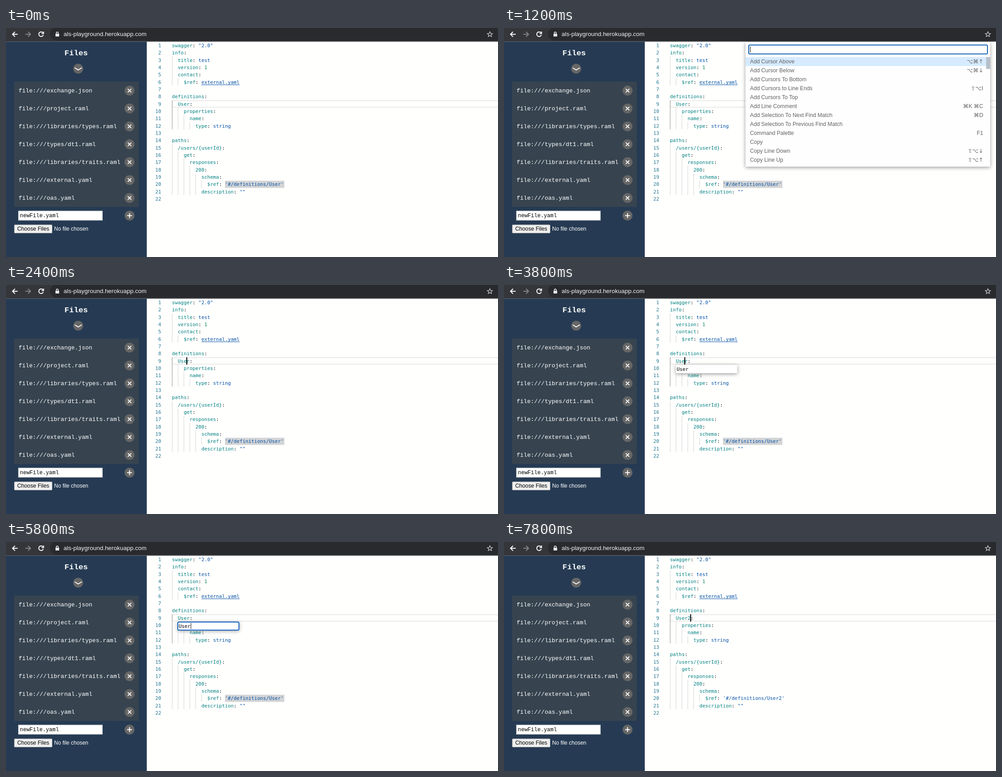
An HTML page that plays this animation: 1094x512 px, repeating every 8 s.

```html
<!DOCTYPE html>
<html lang="en">
<head>
<meta charset="utf-8">
<title>Rename playground</title>
<style>
  html, body { margin: 0; width: 100%; height: 100%; overflow: hidden; background: #fffffe; }
  svg { display: block; width: 1094px; height: 512px; }
  text { white-space: pre; }
  .code { font: 10.86px "DejaVu Sans Mono", monospace; }
  .courier { font: 13px "Liberation Mono", monospace; fill: #fff; }
  .ui { font: 12.2px "Liberation Sans", sans-serif; fill: #616161; }
  .sym { font-family: "DejaVu Sans", sans-serif; }
  .key { fill: #008080; }
  .str { fill: #0451a5; }
  .num { fill: #237893; text-anchor: end; }
  .line { fill: none; stroke: #fff; stroke-width: 2; }
  .shadow { filter: drop-shadow(0 2px 4px #0006); }
</style>
</head>
<body>
<svg viewBox="0 0 1094 512">
  <rect width="1094" height="512" fill="#fffffe"/>
  <rect width="1094" height="30.5" fill="#35363a"/>
  <rect x="98" y="-1" width="1020" height="29" rx="14" fill="#282a2d"/>
  <g class="line">
    <path d="M26 14H15M20 8.5L14.5 14L20 19.5"/>
    <path d="M43 14H54M49 8.5L54.5 14L49 19.5" style="stroke:#85868a"/>
    <path d="M82 10.5A5.2 5.2 0 1 0 83 15.5M83.5 8V12.5H79"/>
    <path d="M111.8 13V11.3A2.3 2.3 0 0 1 116.4 11.3V13" style="stroke-width:1.4"/>
    <path id="star" style="stroke:#c8cacd;stroke-width:1.3"/>
  </g>
  <rect x="110" y="12.7" width="8.2" height="6.3" rx="1" fill="#e8eaed"/>
  <text x="128" y="18" class="ui" style="font-size:13.45px;fill:#f1f3f4">als-playground.herokuapp.com</text>

  <rect y="30.5" width="313" height="482" fill="#263b53"/>
  <text x="156" y="61" class="courier" text-anchor="middle" style="font-size:17.3px;font-weight:bold">Files</text>
  <circle cx="160.5" cy="91" r="11" fill="#666"/>
  <path class="line" d="M153 89L159 93Q160.5 94.2 162 93L168.500 89"/>
  <rect x="18" y="120" width="277" height="280" fill="#374450"/>
  <g id="files"></g>
  <rect x="27.5" y="409" width="187" height="21" fill="#fff" stroke="#b5bac0"/>
  <text x="31" y="423" class="courier" style="font-size:12px;fill:#000">newFile.yaml</text>
  <rect x="18.5" y="440" width="84" height="18.5" rx="1.5" fill="#efefef" stroke="#a0a4a9"/>
  <text x="25" y="453.3" class="ui" style="fill:#000">Choose Files</text>
  <text x="107" y="453.3" class="ui" style="fill:#fff;font-size:12px">No file chosen</text>

  <path d="M1094 162.5H369.5V177H1094" fill="none" stroke="#e4e4e4" stroke-width="1.5"/>
  <rect id="mark" x="487" y="341.5" width="132" height="16" fill="#d3d4d6"/>
  <g id="code" class="code"></g>
  <path d="M434.5 127H519.5" stroke="#0451a5"/>
  <rect id="caret" y="161.5" width="2" height="16.5"/>

  <g id="rename">
    <rect class="shadow" x="382" y="178" width="136.5" height="19" fill="#fff"/>
    <rect id="focus" x="382" y="179" width="136" height="18" rx="2.5" fill="none" stroke="#0f63c6" stroke-width="2"/>
    <text x="384" y="191.8" class="code">User<tspan class="typed"></tspan></text>
    <rect id="renameCaret" y="181" width="1" height="13.5"/>
  </g>

  <g id="palette">
    <rect class="shadow" x="537" y="31" width="544" height="279" fill="#fefefe"/>
    <rect x="544" y="38" width="531" height="20" rx="2.5" fill="#fff" stroke="#1264b5" stroke-width="2"/>
    <rect id="queryCaret" x="547" y="41" width="1" height="14"/>
    <rect x="537" y="65" width="544" height="20" fill="#d6ebff"/>
    <rect x="1072" y="65" width="9" height="26.5" fill="#b7c0c9"/>
    <g id="commands" class="ui"></g>
  </g>
</svg>
<script>
const $ = id => document.getElementById(id);
const CHAR = 6.54, LEFT = 369, PITCH = 16.333;
const TYPED = '<tspan class="typed"></tspan>';

const button = (y, turn) =>
  `<g transform="translate(274.7 ${y}) rotate(${turn})"><circle r="11" fill="#666"/>
   <path class="line" d="M-5.5 0H5.5M0 -5.5V5.5"/></g>`;

const files = ['exchange.json', 'project.raml', 'libraries/types.raml', 'types/dt1.raml',
  'libraries/traits.raml', 'external.yaml', 'oas.yaml'];
$('files').innerHTML = files.map((name, i) =>
  `<text x="28" y="${143.5 + 40 * i}" class="courier">file:///${name}</text>` +
  button(140 + 40 * i, 45)).join('') + button(419.5, 0);

// § marks where the renamed symbol grows
const source = `swagger: "2.0"
info:
  title: test
  version: 1
  contact:
    $ref: external.yaml

definitions:
  User§:
    properties:
      name:
        type: string

paths:
  /users/{userId}:
    get:
      responses:
        200:
          schema:
            $ref: '#/definitions/User§'
          description: ""
`;
$('code').innerHTML = source.split('\n').map((line, i) => {
  const y = 43 + PITCH * i, indent = line.search(/\S|$/);
  let out = `<text x="345" y="${y}" class="num">${i + 1}</text>`;
  for (let col = 0; col < indent; col += 2) {
    const active = col === 0 && i >= 8 && i <= 11;
    out += `<rect x="${LEFT + col * CHAR}" y="${y - 12.3}" width="1" height="${PITCH}" fill="${active ? '#939393' : '#d3d3d3'}"/>`;
  }
  const [, key, value] = line.trim().match(/^([^:]*):?(.*)$/);
  if (key) {
    const fill = value === ' 1' ? ' style="fill:#098658"' : '';
    out += `<text x="${LEFT + indent * CHAR}" y="${y}"><tspan class="key">${key}</tspan>:` +
      `<tspan class="str"${fill}>${value}</tspan></text>`;
  }
  return out.replace('§', TYPED);
}).join('');

const commands = ['Add Cursor Above|⌥⌘↑', 'Add Cursor Below|⌥⌘↓', 'Add Cursors To Bottom|',
  'Add Cursors to Line Ends|⇧⌥I', 'Add Cursors To Top|', 'Add Line Comment|⌘K ⌘C',
  'Add Selection To Next Find Match|⌘D', 'Add Selection To Previous Find Match|',
  'Command Palette|F1', 'Copy|', 'Copy Line Down|⇧⌥↓', 'Copy Line Up|⇧⌥↑'];
$('commands').innerHTML = commands.map((row, i) => {
  const [label, keys] = row.split('|'), y = 79.2 + 20 * i;
  return `<text x="547" y="${y}">${label}</text><text x="1065.5" y="${y}" text-anchor="end">` +
    keys.replace(/[⌥⌘⇧↑↓]/g, '<tspan class="sym">$&</tspan>') + '</text>';
}).join('');

$('star').setAttribute('d', 'M' + Array.from({ length: 10 }, (_, i) => {
  const r = i % 2 ? 2.7 : 6, a = i * Math.PI / 5;
  return `${1076 + r * Math.sin(a)} ${14.3 - r * Math.cos(a)}`;
}).join('L') + 'Z');

const OPEN = 1200, CLOSE = 2400, RENAME = 3800, FOCUS = 4000, TYPE = 6400, APPLY = 7600;
const show = (id, on) => $(id).setAttribute('visibility', on ? 'inherit' : 'hidden');
const boxText = document.querySelector('#rename .typed');
const codeTexts = document.querySelectorAll('#code .typed');

function draw(t) {
  const blink = start => (t - start + 8000) % 1000 < 500;
  const palette = t >= OPEN && t < CLOSE;
  const rename = t >= RENAME && t < APPLY;
  const focus = rename && t >= FOCUS;
  const typed = t >= TYPE, applied = t >= APPLY;

  show('palette', palette);
  show('queryCaret', palette && blink(OPEN));
  show('rename', rename);
  show('focus', focus);
  show('renameCaret', focus && blink(typed ? TYPE : 5600));
  show('mark', !applied);
  show('caret', !palette && !focus && blink(t < OPEN ? 500 : applied ? APPLY : CLOSE));

  boxText.textContent = typed ? '2' : '';
  codeTexts.forEach(el => el.textContent = applied ? '2' : '');
  $('renameCaret').setAttribute('x', typed ? 417.2 : 410.7);
  $('caret').setAttribute('x', LEFT + (applied ? 7 : 5) * CHAR - 0.7);
}

const start = performance.now();
function tick() {
  draw((performance.now() - start) % 8000);
  requestAnimationFrame(tick);
}
tick();
</script>
</body>
</html>
```
